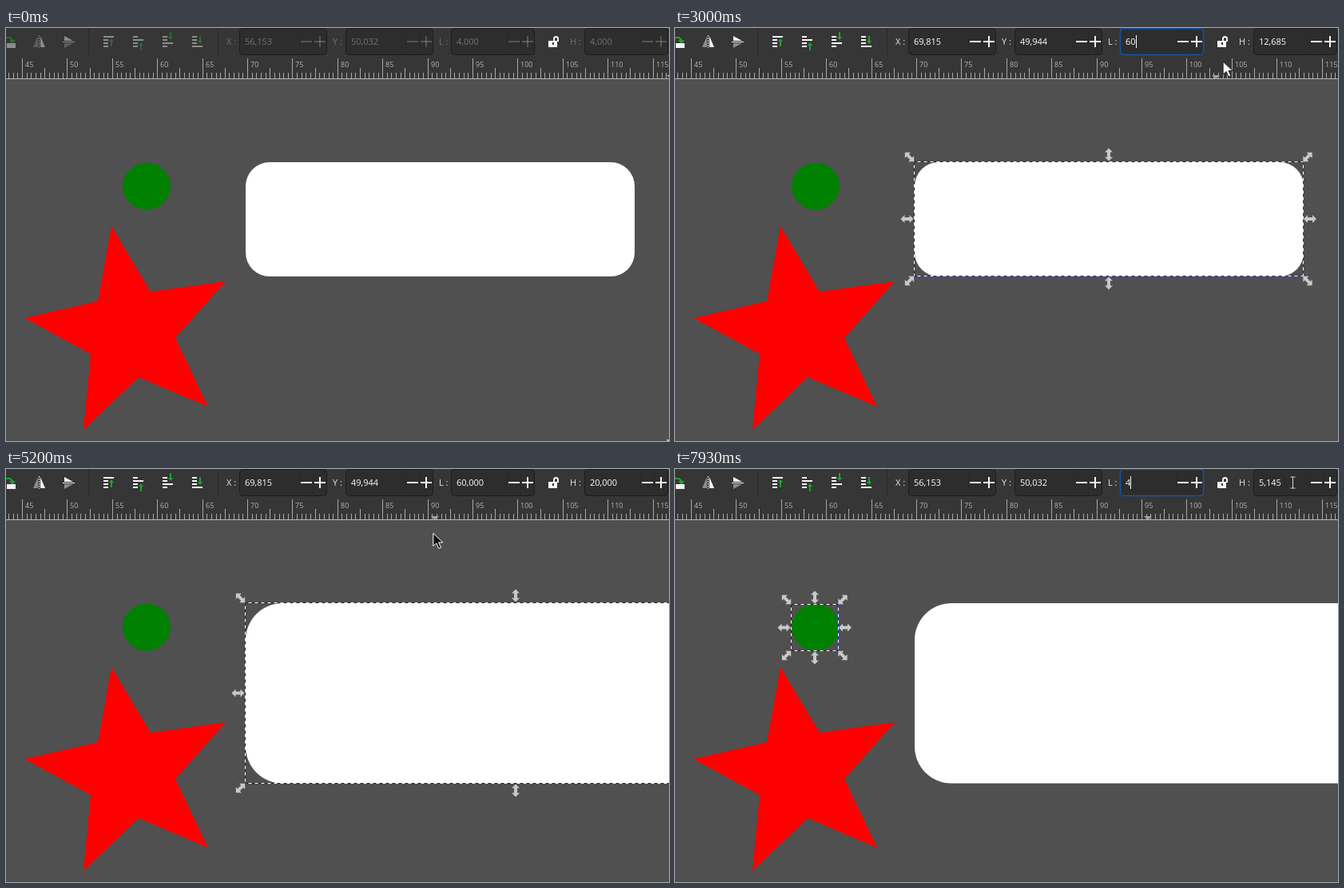
These frames come from a looping animation (830 px wide and 517 px high, 8000 ms). An HTML page with a canvas:

```html
<!DOCTYPE html>
<html>
<head>
<meta charset="utf-8">
<style>
html, body { margin: 0; width: 100%; height: 100%; overflow: hidden; background: #505050; }
canvas { display: block; }
</style>
</head>
<body>
<canvas id="stage" width="830" height="517"></canvas>
<script>
const g = document.getElementById('stage').getContext('2d');
const LOOP = 8000, UNIT = 11.278;
const WHITE = '#f4f4f4', GREEN = '#1fa12e', BAR = '#363636', BLUE = '#15539e';
const FONT = '"Open Sans", "Noto Sans", sans-serif';

// [time, x, y]
const pointerKeys = [
  [0, 828, 515], [330, 828, 515], [670, 671, 270], [1130, 671, 270], [1870, 605, 17],
  [1930, 605, 17], [1990, 549, 13], [2200, 549, 13], [2730, 640, 28], [3000, 686, 42],
  [3150, 705, 46], [3600, 772, 17], [3670, 772, 17], [3930, 717, 23], [4900, 717, 23],
  [5670, 251, 170], [5900, 189, 197], [6040, 189, 197], [6530, 600, 17], [6600, 600, 17],
  [6870, 566, 19], [7130, 524, 36], [7270, 524, 36], [7930, 773, 17]
];
// [time, x]
const markerKeys = [
  [330, 832], [670, 675], [1130, 675], [1690, 615], [2929, 615], [2930, 677], [3130, 677],
  [3131, 704], [5100, 704], [5101, 597], [5670, 255], [5900, 194], [6040, 194], [6400, 592]
];

function along(keys, t, c) {
  const i = keys.findIndex(k => k[0] > t);
  if (i < 0) return keys[keys.length - 1][c];
  if (i === 0) return keys[0][c];
  const a = keys[i - 1], b = keys[i];
  return a[c] + (b[c] - a[c]) * (t - a[0]) / (b[0] - a[0]);
}
const during = (t, a, b) => t >= a && t < b;

function fillRect(color, x, y, w, h) {
  g.fillStyle = color;
  g.fillRect(x, y, w, h);
}
function poly(points, fill, stroke) {
  g.beginPath();
  for (let i = 0; i < points.length; i += 2) g.lineTo(points[i], points[i + 1]);
  g.closePath();
  if (fill) { g.fillStyle = fill; g.fill(); }
  if (stroke) { g.strokeStyle = stroke; g.lineWidth = 1; g.stroke(); }
}
function line(color, width, ...p) {
  g.strokeStyle = color;
  g.lineWidth = width;
  g.beginPath();
  for (let i = 0; i < p.length; i += 2) g.lineTo(p[i], p[i + 1]);
  g.stroke();
}
function at(x, y, angle, draw) {
  g.save();
  g.translate(x, y);
  g.rotate(angle);
  draw();
  g.restore();
}

const DOUBLE_ARROW = [-8, 0, -3, -5, -3, -2, 3, -2, 3, -5, 8, 0, 3, 5, 3, 2, -3, 2, -3, 5];
const ARROW = [0, 0, 0, 16, 4, 12.5, 7, 19, 9.7, 17.8, 6.8, 11.5, 12, 11.5];

function handle(x, y, angle) {
  at(x, y, angle, () => poly(DOUBLE_ARROW, '#c8c8c8'));
}
function selection(x1, y1, x2, y2, rightColor, bottomColor) {
  const edge = (color, ...p) => {
    line('#fff', 1, ...p);
    g.setLineDash([4, 4]);
    line(color, 1, ...p);
    g.setLineDash([]);
  };
  edge('#222', x1, y1, x2, y1);
  edge('#222', x1, y1, x1, y2);
  edge(rightColor, x2, y1, x2, y2);
  edge(bottomColor, x1, y2, x2, y2);
  const mx = (x1 + x2) / 2, my = (y1 + y2) / 2, q = Math.PI / 4;
  handle(x1 - 6, y1 - 6, q);
  handle(x2 + 5.5, y2 + 6, q);
  handle(x2 + 5.5, y1 - 6, -q);
  handle(x1 - 6, y2 + 6, -q);
  handle(mx, y1 - 9, 2 * q);
  handle(mx, y2 + 9, 2 * q);
  handle(x1 - 9, my, 0);
  handle(x2 + 8.5, my, 0);
}

function orderIcon(x, rows, longRow, up) {
  rows.forEach((y, i) => fillRect(WHITE, x, y, i === longRow ? 13 : 6, 2));
  const tip = up ? 12 : 21, dir = up ? 1 : -1, len = rows.length > 3 ? 10 : 7;
  const y = up ? (longRow ? 18 : 13) : (longRow === rows.length - 1 ? 20 : 15);
  poly([x + 10, y, x + 7, y + 4 * dir, x + 13, y + 4 * dir], GREEN);
  line(GREEN, 2, x + 10, y + 3 * dir, x + 10, y + len * dir);
}
function toolbarIcons() {
  line(GREEN, 2, 0, 12, 5, 12, 8, 15, 8, 16);
  poly([4, 15, 12, 15, 8, 20], GREEN);
  fillRect(WHITE, 1, 19, 11, 6);
  poly([34, 24, 40, 24, 40, 10], '#8d8d8d');
  poly([43, 10, 43, 24, 49, 24], WHITE);
  g.setLineDash([2, 1]);
  line(WHITE, 1, 41.5, 9, 41.5, 25);
  g.setLineDash([]);
  poly([73, 10, 73, 16, 84, 16], WHITE);
  poly([73, 19, 73, 25, 84, 19], '#8d8d8d');
  line(WHITE, 1, 71, 17.5, 86, 17.5);
  orderIcon(122, [10, 14, 18, 22], 0, true);
  orderIcon(159, [10, 14, 18, 22], 1, true);
  orderIcon(196, [10, 14, 18, 22], 2, false);
  orderIcon(233, [10, 14, 18, 22], 3, false);
}
function lock() {
  fillRect(WHITE, 679, 16, 11, 8);
  fillRect(BAR, 684, 18, 2, 3);
  g.strokeStyle = WHITE;
  g.lineWidth = 2;
  g.beginPath();
  g.moveTo(686, 17);
  g.lineTo(686, 14);
  g.arc(688.5, 13.5, 2.5, Math.PI, 0);
  g.lineTo(691, 17);
  g.stroke();
}

function field(label, labelX, x, w, text, on, focus, from) {
  g.beginPath();
  g.roundRect(x + .5, .5, w - 1, 33, 4);
  g.fillStyle = '#2d2d2d';
  g.fill();
  g.lineWidth = focus ? 1.6 : 1;
  g.strokeStyle = focus ? BLUE : '#1d1d1d';
  g.stroke();
  fillRect('#292929', x + w - 35, 2, 1, 30);
  fillRect('#292929', x + w - 18, 2, 1, 30);

  g.font = '11px ' + FONT;
  const tx = x + 7, width = s => g.measureText(s).width;
  if (focus && from < text.length) {
    const start = width(text.slice(0, from));
    fillRect(BLUE, tx + start, 9, width(text) - start, 16);
  }
  g.globalAlpha = on ? 1 : .33;
  g.fillStyle = '#e4e4e4';
  g.fillText(label + ' :', labelX, 21);
  g.fillStyle = '#fff';
  g.fillText(text, tx, 21);
  if (focus && from >= text.length) g.fillRect(Math.round(tx + width(text)), 9, 1, 16);
  g.globalAlpha = on ? 1 : .2;
  const r = x + w;
  line(WHITE, 2, r - 33, 17, r - 19, 17);
  line(WHITE, 2, r - 16, 17, r - 2, 17);
  line(WHITE, 2, r - 9, 10, r - 9, 24);
  g.globalAlpha = 1;
}

// First selected character while the pointer drags leftwards through a field.
function dragStart(text, x, t) {
  const offset = along(pointerKeys, t - 80, 1) - x - 7;
  g.font = '11px ' + FONT;
  for (let i = 0; i < text.length; i++)
    if (g.measureText(text.slice(0, i)).width >= offset) return i;
  return text.length;
}

function ruler(t) {
  fillRect(BAR, 0, 34, 830, 30);
  g.font = '9px ' + FONT;
  for (let i = 0; i < 152; i++) {
    const x = Math.floor(20.6 + (i - 4) * UNIT / 2);
    const top = (i - 4) % 10 === 0 ? 38 : (i - 4) % 5 === 0 ? 50 : 56;
    fillRect('#a8a8a8', x, top, 1, 63 - top);
    if (top === 38) {
      g.fillStyle = '#b4b4b4';
      g.fillText(45 + (i - 4) / 2, x + 4, 49);
    }
  }
  fillRect('#b8b8b8', 0, 63, 830, 1);
  const m = along(markerKeys, t, 1);
  poly([m - 5, 59, m + 5, 59, m, 64], '#a0a0a0');
}

function moveBadge(x, y) {
  const arrow = [-7, 0, -3, -4, -3, -1.5, 3, -1.5, 3, -4, 7, 0, 3, 4, 3, 1.5, -3, 1.5, -3, 4];
  poly([x - 7.5, y, x, y - 7.5, x + 7.5, y, x, y + 7.5], '#fff');
  for (const a of [0, Math.PI / 2])
    at(x, y, a, () => { g.scale(.8, .55); poly(arrow, '#111'); });
}
function pointer(t, rectBottom) {
  const x = along(pointerKeys, t, 1), y = along(pointerKeys, t, 2);
  const inField = y < 34 && [[292, 402], [425, 535], [557, 662], [724, 829]].some(([a, b]) => x > a && x < b);
  const dragging = during(t, 1930, 2200) || during(t, 3670, 3880) || during(t, 6600, 6990);
  if (inField || dragging) {
    for (const [color, w] of [['#222', 3], ['#e8e8e8', 1]]) {
      const cx = Math.round(x) + .5, cy = Math.round(y);
      line(color, w, cx, cy - 6.5, cx, cy + 6.5);
      line(color, w, cx - 3, cy - 7, cx + 3, cy - 7);
      line(color, w, cx - 3, cy + 7, cx + 3, cy + 7);
    }
    return;
  }
  const onCanvas = y > 64;
  at(x, y, 0, () => poly(ARROW, onCanvas ? '#111' : '#fff', onCanvas ? '#fff' : '#222'));
  const overShape = (x > 300 && y > 168 && y < rectBottom) || Math.hypot(x - 176, y - 198) < 30;
  if (onCanvas && overShape) moveBadge(x + 19, y + 20);
}

function draw(t) {
  const wide = t >= 3730, tall = t >= 4930;
  const picked = t < 1130 ? '' : t < 6010 ? 'rect' : 'circle';
  const right = wide ? 977 : 787, bottom = tall ? 393.5 : 311;

  fillRect('#505050', 0, 0, 830, 517);
  g.beginPath();
  g.ellipse(176, 198, 30, 29.5, 0, 0, 7);
  g.fillStyle = '#008000';
  g.fill();
  poly([132, 248, 181, 330, 275, 317, 212, 388, 253, 474, 166, 437, 97, 503, 106, 408, 23, 363, 115, 342], '#f00');
  g.beginPath();
  g.roundRect(300, 168, right - 300, bottom - 168, tall ? 46 : wide ? 28 : 30);
  g.fillStyle = '#fff';
  g.fill();

  if (picked === 'rect') selection(299.5, 167.5, right - .5, tall ? 393.5 : 310.5, '#22c', tall ? '#222' : '#22c');
  if (picked === 'circle') selection(145.5, 169.5, 204.5, 227.5, '#22c', '#222');

  fillRect(BAR, 0, 0, 830, 38);
  ruler(t);
  fillRect('#2a2a2a', 103, 0, 1, 33);
  fillRect('#2a2a2a', 265, 0, 1, 33);
  const on = picked !== '';
  g.globalAlpha = on ? 1 : .45;
  toolbarIcons();
  g.globalAlpha = 1;
  lock();

  const rect = picked === 'rect';
  let wText = !on ? '4,000' : rect ? (wide ? '60,000' : '43,202') : '5,234';
  let hText = !on ? '4,000' : rect ? (tall ? '20,000' : '12,685') : '5,145';
  const wFocus = during(t, 1930, 3670) || t >= 6600, hFocus = during(t, 3670, 4930);
  let wFrom = dragStart(wText, 557, t), hFrom = dragStart(hText, 724, t);
  if (during(t, 2070, 2800) || during(t, 6940, 7270)) wFrom = 0;
  if (during(t, 3930, 4530)) hFrom = 0;
  if (during(t, 2800, 3730)) { wText = t < 2930 ? '6' : '60'; wFrom = 9; }
  if (t >= 7270) { wText = '4'; wFrom = 9; }
  if (during(t, 4530, 4930)) { hText = t < 4670 ? '2' : '20'; hFrom = 9; }

  field('X', 276, 292, 110, rect ? '69,815' : '56,153', on, false, 9);
  field('Y', 409, 425, 110, rect ? '49,944' : '50,032', on, false, 9);
  field('L', 542, 557, 105, wText, on, wFocus, wFrom);
  field('H', 706, 724, 105, hText, on, hFocus, hFrom);
  pointer(t, bottom);
}

function tick() {
  draw(performance.now() % LOOP);
  requestAnimationFrame(tick);
}
tick();
</script>
</body>
</html>
```
